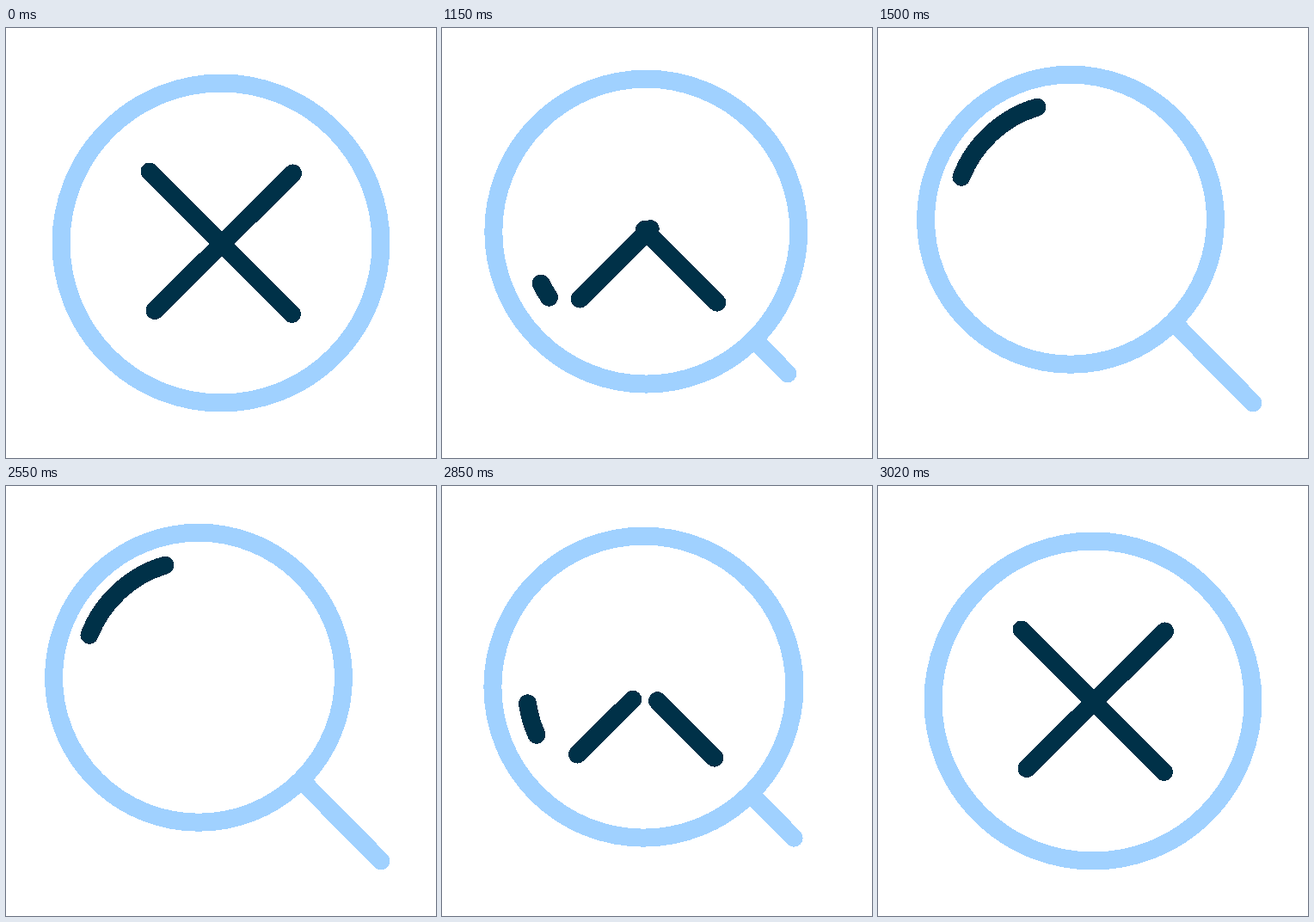
Recreate the animation shown at these times as an HTML page. Size 500 by 500 pixels, loop 3050 ms.

```html
<!DOCTYPE html>
<html lang="en">
<head>
<meta charset="utf-8">
<title>Close and search icon</title>
<style>
  html, body { margin: 0; width: 100%; height: 100%; overflow: hidden; background: #fff; }
  svg { display: block; width: 100%; height: 100%; }
  svg * { fill: none; stroke-width: 21; stroke-linecap: round; shape-rendering: crispEdges; }
  .light { stroke: #a0d1ff; }
  .dark { stroke: #003148; }
</style>
</head>
<body>
<svg viewBox="0 0 500 500">
  <circle id="ring" class="light"/>
  <path id="handle" class="light"/>
  <path id="falling" class="dark"/>
  <path id="rising" class="dark"/>
  <path id="glint" class="dark"/>
</svg>
<script>
const LOOP = 3050, STEP = 25, STEPS = 20;
const part = id => document.getElementById(id);
const mix = (a, b, k) => a + (b - a) * k;
const clamp = v => Math.min(1, Math.max(0, v));

function bezier(x1, y1, x2, y2) {
  const axis = (a, b, s) => 3 * a * s * (1 - s) ** 2 + 3 * b * s * s * (1 - s) + s ** 3;
  return x => {
    if (x <= 0 || x >= 1) return clamp(x);
    let lo = 0, hi = 1;
    for (let i = 0; i < 30; i++) {
      const mid = (lo + hi) / 2;
      if (axis(x1, x2, mid) < x) lo = mid; else hi = mid;
    }
    return axis(y1, y2, lo);
  };
}

const morphEase = bezier(0.333, 0.09, 0.28, 1);
const glintEase = bezier(0.25, 0.05, 0.25, 1);

// Position between cross (0) and magnifier (1), in 25 ms steps; the way back is mirrored.
function phaseAt(time) {
  const t = Math.floor(time / 10) * 10 + 5;
  const steps = start => Math.min(STEPS, Math.max(0, Math.floor((t - start) / STEP)));
  return (steps(1000) - steps(2525)) / STEPS;
}

function drawLine(id, visible, x1, y1, x2, y2) {
  part(id).setAttribute("d", visible ? `M${x1} ${y1}L${x2} ${y2}` : "");
}

function draw(time) {
  const phase = phaseAt(time);
  const p = morphEase(phase / 0.9);
  const q = glintEase((phase - 0.2) / 0.7);
  const dx = -26 * p, dy = -27.3 * p;
  const cx = 250 + dx, cy = 250 + dy, r = mix(186, 168.5, p);

  const ring = part("ring");
  ring.setAttribute("cx", cx);
  ring.setAttribute("cy", cy);
  ring.setAttribute("r", r);

  const edge = r * Math.SQRT1_2;
  const tip = mix(369, 436, p);
  drawLine("handle", tip > cx + edge, cx + edge, cy + edge, tip, tip);

  const crossed = p < 1;
  drawLine("falling", crossed,
    mix(167, 332.5, p) + dx, mix(167, 332.5, p) + dy, 332.5 + dx, 332.5 + dy);
  drawLine("rising", crossed,
    mix(333.5, 173, p) + dx, mix(169, 328.5, p) + dy, 173 + dx, 328.5 + dy);

  const onGlint = degrees => {
    const a = degrees * Math.PI / 180;
    return `${cx + 136.3 * Math.cos(a)} ${cy + 136.3 * Math.sin(a)}`;
  };
  part("glint").setAttribute("d", q > 0
    ? `M${onGlint(mix(136, 201.3, q))}A136.3 136.3 0 0 1 ${onGlint(mix(136, 253.4, q))}`
    : "");
}

const began = performance.now();
function tick() {
  draw((performance.now() - began) % LOOP);
  requestAnimationFrame(tick);
}
tick();
</script>
</body>
</html>
```
